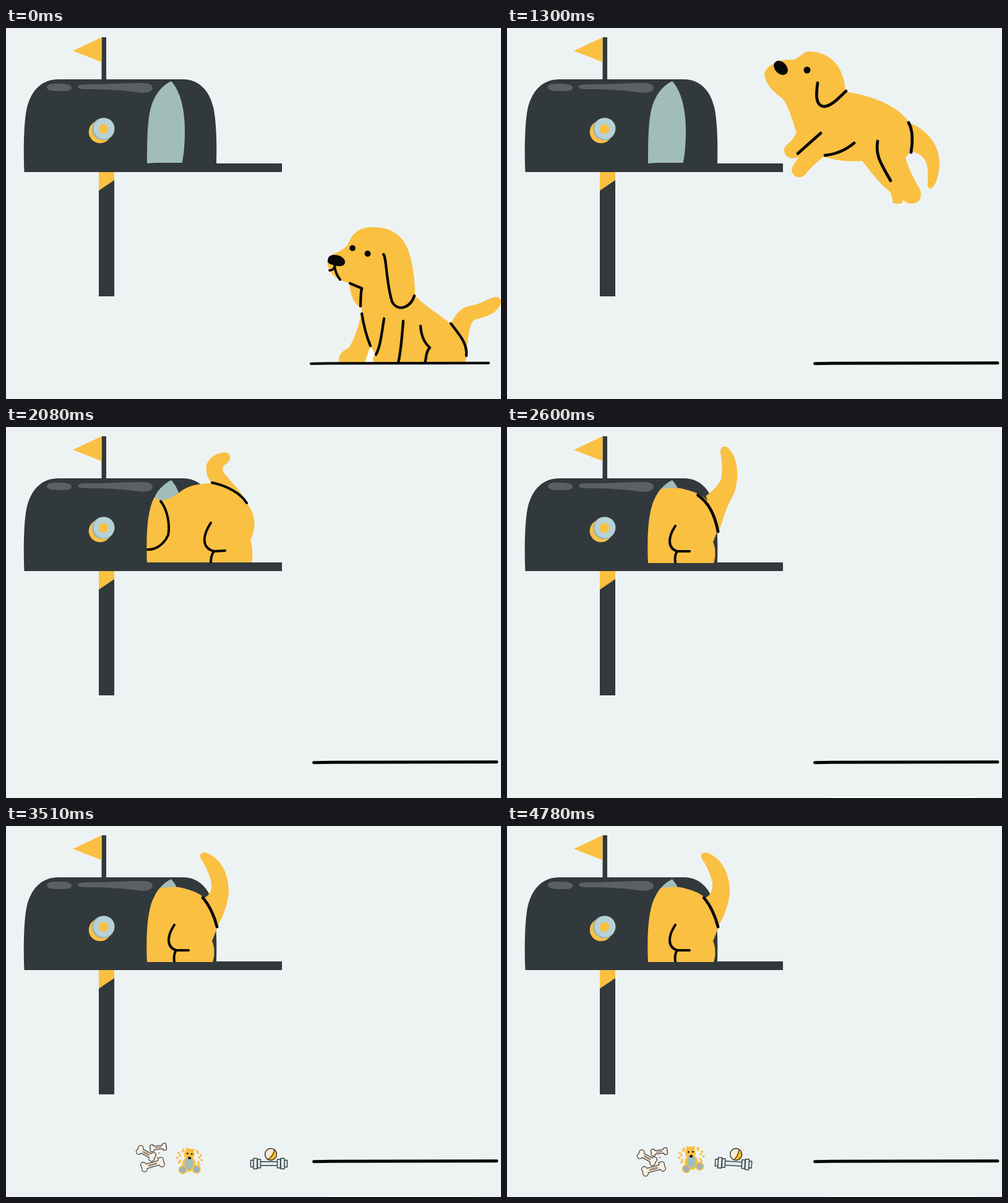
Write an HTML page with a canvas that moves like this. It is 800x600 px and loops after 4940 ms.

```html
<!DOCTYPE html>
<html lang="en">
<head>
<meta charset="utf-8">
<title>Puppy and mailbox</title>
<style>
html, body { margin: 0; width: 100%; height: 100%; overflow: hidden; background: #edf3f3; }
canvas { display: block; }
</style>
</head>
<body>
<canvas id="stage" width="800" height="600"></canvas>
<script>
const ctx = document.getElementById('stage').getContext('2d');
const LOOP = 4940;
const YELLOW = '#fac042', DARK = '#32393c', INK = '#080808', TEAL = '#a1bdb9';
ctx.lineCap = ctx.lineJoin = 'round';

const fill = (d, color) => {
  ctx.fillStyle = color;
  ctx.fill(new Path2D(d));
};
const line = (d, width = 4.3, color = INK) => {
  ctx.strokeStyle = color;
  ctx.lineWidth = width;
  ctx.stroke(new Path2D(d));
};
const oval = (x, y, rx, ry, color, turn = 0) => {
  ctx.fillStyle = color;
  ctx.beginPath();
  ctx.ellipse(x, y, rx, ry, turn, 0, Math.PI * 2);
  ctx.fill();
};
const dot = (x, y, r, color = INK) => oval(x, y, r, r, color);
const place = (x, y, turn, draw) => {
  ctx.save();
  ctx.translate(x, y);
  ctx.rotate(turn);
  draw();
  ctx.restore();
};
const mix = (a, b, k) => a + (b - a) * k;

// Piecewise linear value of rows [time, ...values].
function keyed(rows, t) {
  let i = 0;
  while (i < rows.length - 2 && t >= rows[i + 1][0]) i++;
  const a = rows[i], b = rows[i + 1];
  const k = Math.min(1, Math.max(0, (t - a[0]) / (b[0] - a[0])));
  return a.slice(1).map((v, j) => mix(v, b[j + 1], k));
}

function ground(x1, x2, y, width) {
  line(`M${x1} ${y + 0.5}L${x1 + 30} ${y}L${x2} ${y - 0.5}`, width);
}

function mailbox() {
  fill('M150 233H175V434H150Z', DARK);
  fill('M150 233H175V246L150 263Z', YELLOW);
  fill('M154.5 15H162V85H154.5Z', DARK);
  fill('M108 37L154.5 15V55Z', YELLOW);
  fill('M29.5 233C28 190 29 150 34 128C42 98 60 83 85 83H287C312 84 328 100 335 128C340 150 341 190 340 219H446V233Z', DARK);
  fill('M66 96C66 89 78 90 88 90C100 90 107 93 106 97C105 102 98 102 86 102C75 102 66 101 66 96Z', '#5b6163');
  fill('M116 95C117 91 122 91 150 91C180 90 200 89 222 89C233 89 237 93 237 97C236 104 225 106 213 104C190 101 170 100 150 99C130 99 116 100 116 95Z', '#5b6163');
  dot(152, 168, 18.3, YELLOW);
  dot(157, 163.5, 18, '#98b3b8');
  dot(158.5, 162.5, 17, '#b6d2d7');
  dot(157.5, 163.3, 7.7, YELLOW);
  fill('M228 219C228 170 229 140 237 120C244 103 254 92 267 86C281 101 289 130 289 165C289 190 287 208 284.5 218L241 218Z', TEAL);
}

function sittingDog(wag) {
  place(730, 490, wag, () => {
    ctx.translate(-730, -490);
    fill('M719 478C727 460 738 451 752 449C768 446 783 436 790 435C799 434 802 442 799 447C793 461 780 466 757 472C750 478 748 490 745 520Z', YELLOW);
  });
  fill('M580 541L589 514L597 528L594 541Z', '#fff');
  fill('M527 366C540 361 550 357 555 345C561 330 573 322 594 322C622 322 643 335 652 365C658 385 661 410 661 432C672 446 695 460 715 475C735 492 746 513 743 541H594C592 535 594 531 597 528L589 514L580 541H538C536 530 543 522 553 518C560 510 568 490 574 463L575 452C566 451 557 437 555 413L541 408C527 402 520 390 519 378Z', YELLOW);
  line('M556 413L575 421C573 430 573 440 573 450M575 462C578 480 583 500 589 514M611 470C607 495 605 515 598 528M642 474C640 500 638 525 634 541');
  line('M670 482C671 500 677 510 685 517C677 525 680 535 677 541M610 366C615 370 614 410 624 443C634 460 654 452 660 433M719 478C732 495 746 510 744 530');
  line('M523 392C528 392 532 388 531 384C532 395 536 402 540 407', 3.8);
  dot(560, 356, 4.8);
  dot(584.5, 365, 5);
  fill('M520 375C521 366 530 366 538 368C546 371 550 377 547 382C543 387 533 385 528 383C522 382 519 379 520 375Z', INK);
  ground(493, 780, 542.3, 4.3);
}

function frontDog(asleep) {
  fill('M708 458C720 440 735 425 745 425C752 427 753 436 748 442C735 455 728 462 715 490Z', YELLOW);
  fill('M560 378C548 380 542 370 542 356C546 335 545 318 551 307C558 297 575 298 585 310C590 317 594 321 601 320C612 317 622 318 633 318C640 316 644 309 649 303C658 290 676 286 692 295C706 305 712 328 716 350C718 368 714 382 700 381C696 381 693 379 691 377C692 395 688 408 684 417C697 427 705 448 712 470C715 490 712 505 712 518C720 524 723 530 724 541H550C550 528 555 520 565 515C573 505 574 475 584 449C575 443 574 435 571 425C563 410 559 395 560 378Z', YELLOW);
  line('M561 377C571 372 570 353 584 355M668 353C677 352 678 370 691 378', 4.6);
  if (asleep) line('M582 394.5L597 394M626 392L641 390.5', 4.8);
  else {
    dot(590, 393, 5);
    dot(634, 390, 5);
  }
  fill('M591 430C592 420 604 416 617 416C628 416 630 422 629 429C627 436 614 441 604 440C596 439 590 436 591 430Z', INK);
  line('M598 453C605 453 611 450 612 445C615 451 622 453 631 452M611 439L612 446', 4.6);
  line('M608 484C611 505 594 515 599 540M654 475C660 500 648 515 645 540M686 466C693 490 685 510 690 540M709 455C712 463 715 475 715 492', 4.6);
  ground(533, 758, 543, 4.3);
}

function leapingDog() {
  fill('M650 153C680 165 700 190 699 222C697 242 693 255 685 260C680 259 679 257 680 248C681 225 680 205 654 200Z', YELLOW);
  fill('M417 80C414 70 420 64 430 58C440 50 450 52 465 51C475 46 478 38 490 38C520 39 545 60 547 103C590 109 630 125 650 152C656 170 656 185 652 200L644 210C650 230 658 245 668 262C671 275 666 284 654 284C648 284 643 281 640 278C640 284 634 286 624 283C622 275 622 268 617 263C600 250 588 232 574 215C550 217 530 214 512 208C500 218 490 226 482 237C476 245 461 242 460 230C461 222 468 215 472 208C465 213 450 212 448 199C447 190 455 188 459 183L468 170C463 155 460 140 448 117C435 105 422 98 417 80Z', YELLOW);
  line('M502 89C499 110 499 125 512 127C524 127 536 113 548 102M507 170L470 203M514 206C532 204 548 197 561 186M599 183C595 207 605 220 620 247M649 153C656 165 656 185 653 201', 4.8);
  dot(485, 68, 5.5);
  oval(442.5, 64.5, 13, 9.5, INK, 0.8);
}

function crawlingDog() {
  fill('M333 91C326 84 322 72 324 62C329 47 343 41 355 41C364 43 365 52 357 59C350 62 348 68 352 74C365 90 378 102 387 118Z', YELLOW);
  fill('M249 119C262 118 272 111 279 107C292 95 310 91 334 91C358 95 378 107 390 124C402 140 406 160 395 183C399 195 399 208 397 219H200L195 205C170 200 150 195 150 178C150 160 165 150 180 148C186 130 205 108 232 112C240 114 245 117 249 119Z', YELLOW);
  line('M250 120C262 135 265 160 262 175C255 190 240 202 222 197M333 90C358 95 380 108 389 123', 4);
  line('M331 155C318 175 315 195 336 201L354 200M336 201C332 207 331 212 331 219', 4);
  oval(155, 170, 9, 7, INK);
  dot(187, 160, 5);
}

const TAIL_UP = [318,117, 330,113, 333,103, 332,92, 329,78, 323,65, 315,53, 310,44, 319,41, 326,44,
  350,55, 360,80, 360,107, 359,122, 353,140, 348,150, 345,155, 343,160, 341,163];
const TAIL_OUT = [328,122, 343,106, 356,106, 370,106, 385,103, 395,90, 401,74, 405,63, 418,62, 419,72,
  421,95, 405,125, 378,134, 358,137, 354,137, 352,150, 348,165, 345,175, 341,180];

function wagTail(k) {
  const lift = 22 * Math.sin(Math.PI * k);
  const p = TAIL_UP.map((v, i) => {
    const m = mix(v, TAIL_OUT[i], k);
    return i % 2 ? m - lift * Math.max(0, 160 - m) / 110 : m;
  });
  ctx.fillStyle = YELLOW;
  ctx.beginPath();
  ctx.moveTo(p[0], p[1]);
  for (let i = 2; i < p.length; i += 6) ctx.bezierCurveTo(...p.slice(i, i + 6));
  ctx.fill();
}

function stuckDog(k) {
  wagTail(k);
  fill('M200 106C250 100 265 98 280 99C300 103 318 110 328 124C338 140 341 152 341 166L333 186C337 195 338 208 334 220H200Z', YELLOW);
  line(`M${mix(318, 291, k)} ${mix(116, 100, k)}C${mix(328, 322, k)} ${mix(127, 112, k)} ${mix(337, 335, k)} ${mix(146, 140, k)} 341 ${mix(163, 180, k)}`, 4.8);
  line('M272 160C260 178 259 196 275 201L295 201M275 201C271 207 271 212 272 219', 4);
}

function insideBox(draw) {
  ctx.save();
  ctx.clip(new Path2D('M228 220C226 170 229 140 237 120C244 103 254 92 267 86V0H800V220Z'));
  draw();
  ctx.restore();
}

function bone(x, y, len, turn, s) {
  place(x, y, turn, () => {
    const h = len / 2 - 3 * s;
    for (const [grow, color] of [[1.3, '#4d4442'], [0, '#f6efe2']]) {
      line(`M${-h} 0H${h}`, 5.5 * s + grow * 2, color);
      for (const ex of [-h, h])
        for (const ey of [-3 * s, 3 * s]) dot(ex, ey, 3.3 * s + grow, color);
    }
    line(`M${-h * 0.4} 0H${h * 0.4}`, 3 * s, '#a38d7d');
  });
}

function bones() {
  bone(-8.5, -6.5, 30, 0.5, 1.1);
  bone(11, -16, 25, -0.12, 0.8);
  bone(2, 11.5, 36, -0.28, 1.15);
  for (const [x, y] of [[7, -4], [12, -7], [-14, 8], [10, 1]]) dot(x, y, 1.1, '#6b5d57');
}

function plushDog() {
  for (const side of [-1, 1])
    for (let i = 0; i < 8; i++) {
      const a = -1.25 + i * 0.27, r = i % 2 ? 20 : 16;
      dot(side * Math.cos(a) * r, -6 + Math.sin(a) * 15, 2, YELLOW);
    }
  oval(0, 4, 11, 12, YELLOW);
  oval(-1, -12, 8.5, 9.5, YELLOW);
  oval(0, 3, 7, 10, TEAL);
  for (const [x, y] of [[-9, 14], [13, 11]]) {
    dot(x, y, 7, YELLOW);
    dot(x, y, 5.2, '#9bb3b7');
  }
  dot(-4, -13, 1.4);
  dot(3, -13, 1.4);
  oval(0, -6, 2.6, 2, INK);
}

function plate(x, w, h) {
  const d = `M${x - w / 2} ${-h / 2}h${w}v${h}h${-w}Z`;
  fill(d, '#dfeaec');
  line(d, 1.4, '#333b3e');
}

function dumbbell(turn) {
  place(0, 0, turn, () => {
    plate(0, 40, 6.5);
    for (const side of [-1, 1]) {
      plate(side * 27, 5, 11);
      plate(side * 22, 6, 17);
      plate(side * 16, 5, 14);
    }
  });
  place(3 + 18 * turn, -15, -2 * (turn + 0.5), () => {
    dot(0, 0, 9.5, '#f4ead6');
    ctx.fillStyle = '#f7bd2d';
    ctx.beginPath();
    ctx.arc(0, 0, 9.5, 0.1, Math.PI - 0.1);
    ctx.fill();
    line('M-9 1Q0 5 9 1', 1.2, '#40372f');
    line('M-9.5 0A9.5 9.5 0 1 1 9.5 0A9.5 9.5 0 1 1 -9.5 0', 1.5, '#40372f');
  });
}

// Rows: time, x, y, turn.
const BONES = [[2990, 216, 355, -0.2], [3120, 228, 420, 0], [3250, 214, 490, 0], [3380, 204, 543, -0.2],
  [3510, 235, 536, 0], [3660, 241, 544, 0], [3980, 242, 544, 0], [4140, 239, 544, 0],
  [4300, 231, 544, -0.1], [4460, 211, 543, -0.2], [4620, 231, 543, 0], [4780, 235, 543, 0]];
const PLUSH = [[2990, 265, 430, -0.3], [3120, 275, 495, -0.1], [3250, 284, 543, 0.1], [3380, 291, 531, 0.2],
  [3510, 296, 543, 0.1], [3980, 299, 543, 0], [4300, 300, 542, 0.1], [4780, 298, 540, -0.05]];
const WEIGHT = [[2990, 355, 470, -0.8], [3120, 374, 543, -0.4], [3250, 400, 546, 0], [3380, 420, 546, 0.2],
  [3510, 425, 546, 0], [3660, 388, 546, -0.4], [3820, 371, 546, -0.2], [3980, 368, 546, -0.6],
  [4140, 368, 546, -0.2], [4300, 368, 546, 0.1], [4460, 367, 546, -0.4], [4620, 366, 546, -0.2],
  [4780, 366, 546, 0.06]];

function toys(t) {
  const [bx, by, br] = keyed(BONES, t), [px, py, pr] = keyed(PLUSH, t), [wx, wy, wr] = keyed(WEIGHT, t);
  place(bx, by, br, bones);
  place(px, py, pr, plushDog);
  place(wx, wy, 0, () => dumbbell(wr));
}

// The picture holds for 130 ms, later 160 ms.
function hold(t) {
  if (t < 390) return 0;
  if (t < 3660) return Math.min(3510, 390 + 130 * Math.floor((t - 390) / 130));
  return 3660 + 160 * Math.floor((t - 3660) / 160);
}

function wag(t) {
  if (t >= 4460) return 0;
  if (t >= 3660) return [0.35, 0.7, 0][Math.round((t - 3660) / 160) % 3];
  return [1, 0.7, 0.35, 0, 0.35, 0.7][(Math.round((t - 3120) / 130) + 12) % 6];
}

const LEAP = [[1040, 60, 255], [1170, 38, 105], [1300, 0, 0], [1430, -60, -36]];
const CRAWL = [[1560, 75], [2080, 0], [2470, -42]];

function draw(t) {
  ctx.fillStyle = '#edf3f3';
  ctx.fillRect(0, 0, 800, 600);
  mailbox();
  if (t < 650) return sittingDog(t === 390 ? -0.2 : 0);
  if (t < 1040) return frontDog(t === 780);
  ground(497.5, 793, 542.3, 5);
  if (t < 1560) {
    const [x, y] = keyed(LEAP, t);
    place(x, y, 0, leapingDog);
  } else if (t < 2600) {
    insideBox(() => place(keyed(CRAWL, t)[0], 0, 0, crawlingDog));
  } else {
    insideBox(() => stuckDog(wag(t)));
    ctx.fillStyle = '#fff';
    ctx.fillRect(522, 598, 234, 2);
    if (t >= 2990) toys(t);
  }
}

function tick() {
  draw(hold(performance.now() % LOOP));
  requestAnimationFrame(tick);
}
tick();
</script>
</body>
</html>
```
